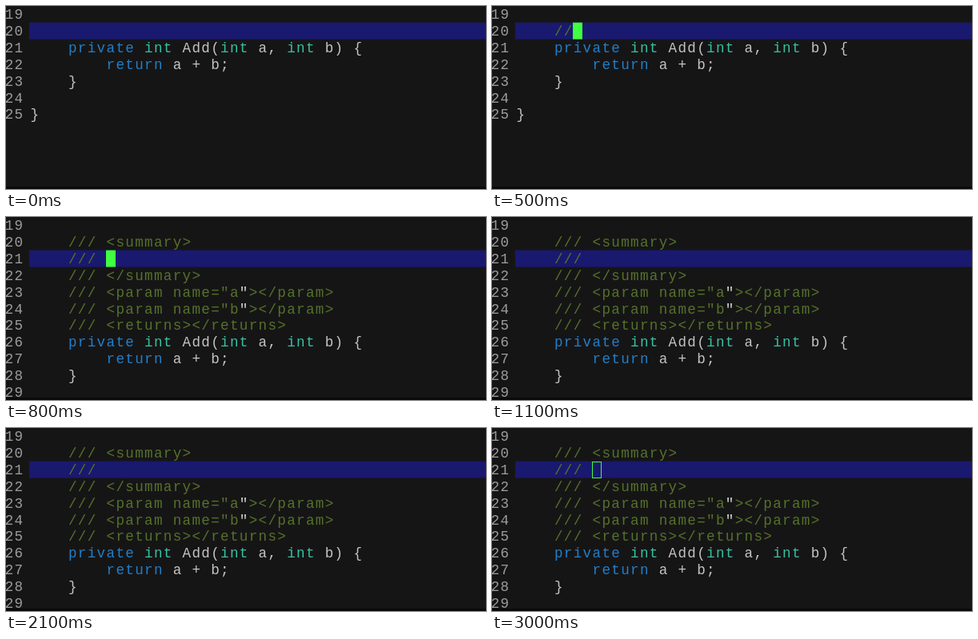
These frames come from a looping animation (600x229 px, 3400 ms). An HTML page with a canvas:

```html
<!DOCTYPE html>
<html lang="en">
<head>
<meta charset="utf-8">
<title>Doc comment expansion</title>
<style>
html, body { margin: 0; width: 100%; height: 100%; overflow: hidden; background: #161516; }
canvas { display: block; }
</style>
</head>
<body>
<canvas id="stage" width="600" height="229"></canvas>
<script>
const ctx = document.getElementById('stage').getContext('2d');
const LOOP = 3400, CHAR = 11.88, LINE = 20.9, LEFT = 29.8, FIRST = 19;
const COLORS = {
  plain: '#c4c4c4', comment: '#55722a', keyword: '#217fc8', type: '#36c2a2',
  gutter: '#9c9c9c', cursor: '#40ff40', bar: '#191970', back: '#161516'
};

const method = [
  '    private int Add(int a, int b) {',
  '        return a + b;',
  '    }',
  ''
];
const docs = [
  '<summary>', '', '</summary>',
  '<param name="a"></param>', '<param name="b"></param>',
  '<returns></returns>'
].map(tag => '    /// ' + tag);

const lineTop = row => row * LINE - 0.2;

// Each character is centred in its own fixed-width cell.
function drawText(text, x, row, color) {
  ctx.fillStyle = color;
  [...text].forEach((ch, i) => ctx.fillText(ch, x + (i + 0.5) * CHAR, row * LINE + 16));
}

function tokenColor(token) {
  if (/^(private|return)$/.test(token)) return COLORS.keyword;
  return token === 'int' ? COLORS.type : COLORS.plain;
}

function drawLine(text, row) {
  drawText(String(FIRST + row), -2, row, COLORS.gutter);
  if (text.trim().startsWith('/')) {
    drawText(text, LEFT, row, COLORS.comment);
    // The closing quote of an attribute is highlighted as plain text.
    const quote = text.lastIndexOf('"');
    if (quote > 0) drawText('"', LEFT + quote * CHAR, row, COLORS.plain);
    return;
  }
  for (const { 0: token, index } of text.matchAll(/\w+|[^\w\s]/g))
    drawText(token, LEFT + index * CHAR, row, tokenColor(token));
}

function drawCursor(col, row, hollow) {
  const x = Math.round(LEFT + col * CHAR), y = lineTop(row);
  ctx.fillStyle = ctx.strokeStyle = COLORS.cursor;
  if (hollow) ctx.strokeRect(x + 0.5, Math.round(y) + 0.5, 11, 20);
  else ctx.fillRect(x, y, 12, LINE);
}

function editorAt(t) {
  if (t >= 600) {
    const hollow = t >= 3000;
    const visible = hollow || Math.floor((t - 600) / 500) % 2 === 0;
    return { lines: ['', ...docs, ...method], row: 2, col: 8, visible, hollow };
  }
  const slashes = t < 300 ? 0 : t < 500 ? 1 : 2;
  const typed = '    ' + '/'.repeat(slashes);
  return { lines: ['', typed, ...method, '}'], row: 1, col: typed.length, visible: t >= 100, hollow: false };
}

function draw(t) {
  const { lines, row, col, visible, hollow } = editorAt(t);
  ctx.fillStyle = COLORS.back;
  ctx.fillRect(0, 0, 600, 229);
  ctx.fillStyle = '#0b0a0b';
  ctx.fillRect(0, 226, 600, 3);
  ctx.fillStyle = COLORS.bar;
  ctx.fillRect(29, lineTop(row), 571, LINE);
  ctx.font = '17.6px "Liberation Mono", monospace';
  ctx.textAlign = 'center';
  lines.forEach(drawLine);
  if (visible) drawCursor(col, row, hollow);
}

const start = performance.now();
function tick() {
  draw((performance.now() - start) % LOOP);
  requestAnimationFrame(tick);
}
tick();
</script>
</body>
</html>
```
